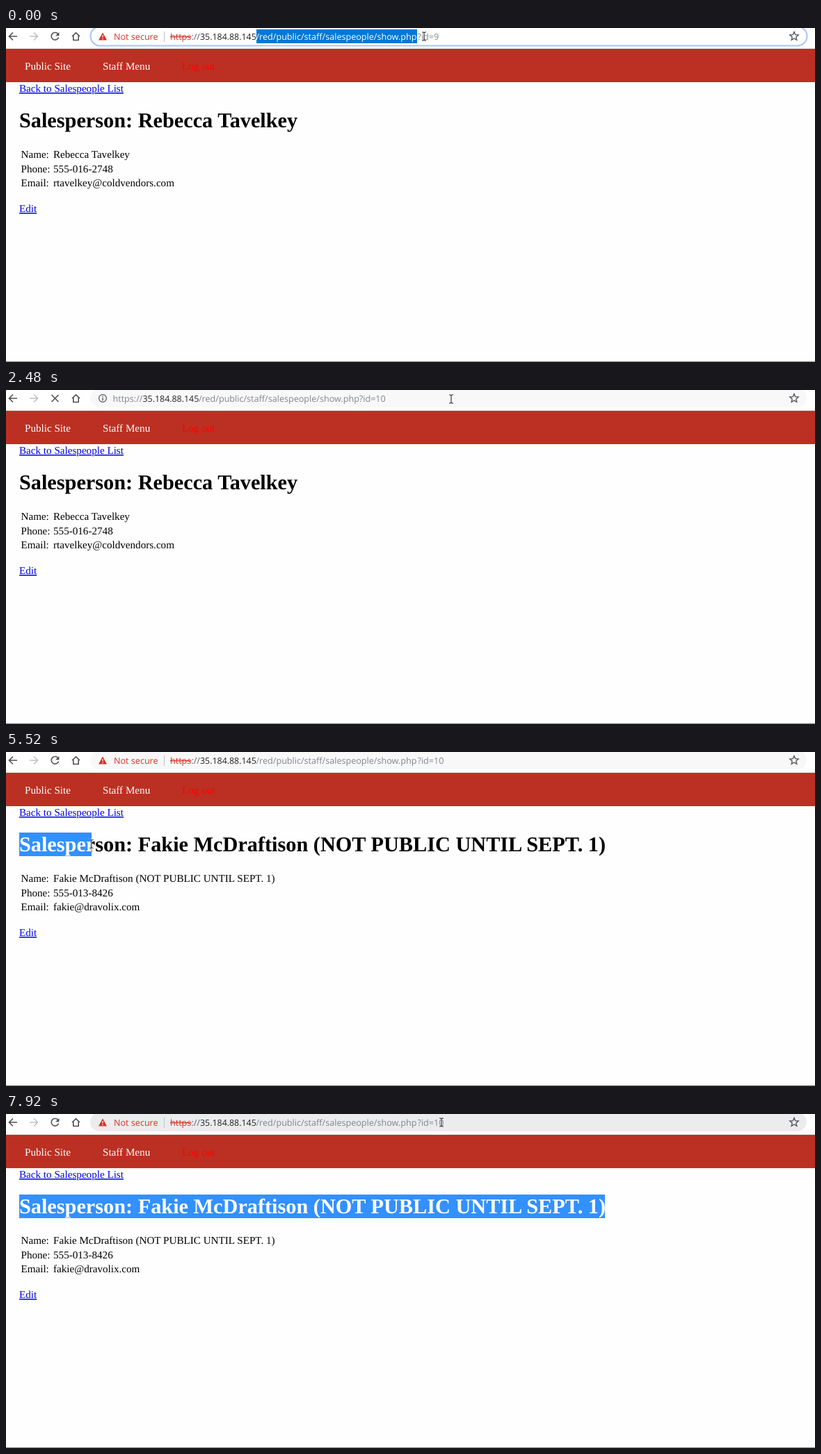
An HTML page for the animation above (8000 ms loop, 1163x481 px).

```html
<!DOCTYPE html>
<html lang="en">
<head>
<meta charset="utf-8">
<title>Salesperson record</title>
<style>
  html, body { margin: 0; width: 100%; height: 100%; overflow: hidden; background: #fefefe; }
  svg { display: block; text-rendering: geometricPrecision; }
  .ui { font: 12.6px "Open Sans", "Noto Sans", sans-serif; fill: #80868b; }
  .page { font: 15.14px "Liberation Serif", "Times New Roman", serif; fill: #000; }
  .h1 { font-size: 30.28px; font-weight: 700; }
  .link { fill: #00e; text-decoration: underline; }
  .dark { fill: #202124; }
  .host { fill: #202124; font-size: 12.4px; }
  .mid { fill: #5f6368; }
  .warn { fill: #d93025; }
  .hit { fill: #1a73e8; font-size: 12.83px; font-weight: 700; }
  .white, .white text { fill: #fff; }
  .line { fill: none; stroke: #4d5054; stroke-width: 1.6; }

  /* Every timeline is 8 s long and changes in hard steps. */
  .t { opacity: 0; animation: 8s step-end infinite; }
  .secure { animation-name: secure; }
  .focus { animation-name: focus; }
  .marked { animation-name: marked; }
  .caret { animation-name: caret; }
  .panel { animation-name: panel; }
  .rows3 { animation-name: rows3; }
  .rows2 { animation-name: rows2; }
  .loading { animation-name: loading; }
  .ready { animation-name: ready; }
  .idle { animation-name: idle; }
  .after { animation-name: after; }
  .before { animation-name: before; }
  .hover { animation-name: hover; }
  .all { animation-name: all; }
  .beam { animation-name: beam; }
  .arrow { animation-name: arrow; }
  .hand { animation-name: hand; }
  @keyframes secure { 0%, 34.375% { opacity: 1 } 19.5% { opacity: 0 } }
  @keyframes focus { 0% { opacity: 1 } 19.5% { opacity: 0 } }
  @keyframes marked { 0% { opacity: 1 } 8.75% { opacity: 0 } }
  @keyframes caret { 8.75% { opacity: 1 } 16% { opacity: 0 } }
  @keyframes panel { 19.5% { opacity: 1 } 31% { opacity: 0 } }
  @keyframes rows3 { 19.5% { opacity: 1 } 27.5% { opacity: 0 } }
  @keyframes rows2 { 27.5% { opacity: 1 } 31% { opacity: 0 } }
  @keyframes loading { 31% { opacity: 1 } 34.375% { opacity: 0 } }
  @keyframes ready { 0%, 34.375% { opacity: 1 } 31% { opacity: 0 } }
  @keyframes idle { 31%, 100% { opacity: 1 } }
  @keyframes after { 34.375%, 100% { opacity: 1 } }
  @keyframes before { 0% { opacity: 1 } 34.375% { opacity: 0 } }
  @keyframes hover { 95.625%, 100% { opacity: 1 } }
  @keyframes all { 78.25% { opacity: 1 } 81.5% { opacity: 0 } }
  @keyframes beam {
    0%, 52.625%, 93.9% { opacity: 1 }
    42.5%, 83.5% { opacity: 0 }
  }
  @keyframes arrow {
    42.5%, 51%, 83.5% { opacity: 1 }
    49.25%, 52.625%, 93.9% { opacity: 0 }
  }
  @keyframes hand { 49.25% { opacity: 1 } 51% { opacity: 0 } }

  /* Typed digits */
  .one, .zero { visibility: hidden; animation: one 8s step-end infinite; }
  .zero { animation-name: zero; }
  @keyframes one { 0% { visibility: hidden } 21.75%, 100% { visibility: visible } }
  @keyframes zero { 0% { visibility: hidden } 27.5%, 100% { visibility: visible } }

  .typing { animation: typing 8s step-end infinite; }
  @keyframes typing {
    0% { transform: translateX(-7px) }
    21.75% { transform: none }
    27.5% { transform: translateX(7px) }
  }

  .drag { width: 0; animation: drag 8s step-end infinite; }
  @keyframes drag {
    0% { width: 0px }
    69% { width: 4px; animation-timing-function: steps(4, jump-both) }
    76.5% { width: 503px }
    78.25% { width: 850px }
    81.5%, 100% { width: 842px }
  }

  .mouse { animation: mouse 8s step-end infinite; }
  @keyframes mouse {
    0% { transform: translate(601px, 12px) }
    1.875% { transform: translate(601px, 12px); animation-timing-function: steps(2, jump-both) }
    5.25% { transform: translate(640px, 13px) }
    40.875% { transform: translate(640px, 13px); animation-timing-function: steps(5, jump-both) }
    49.25% { transform: translate(169px, 88px) }
    51% { transform: translate(112px, 118px) }
    52.625% { transform: translate(80px, 131px) }
    58.375% { transform: translate(80px, 131px); animation-timing-function: steps(3, jump-both) }
    63.625% { transform: translate(23px, 131px) }
    69% { transform: translate(23px, 131px); animation-timing-function: steps(4, jump-both) }
    76.5% { transform: translate(522px, 138px) }
    78.25% { transform: translate(621px, 151px) }
    80% { transform: translate(760px, 151px) }
    81.5% { transform: translate(862px, 141px) }
    83.5% { transform: translate(873px, 152px) }
    85.25% { transform: translate(873px, 152px); animation-timing-function: steps(6, jump-both) }
    95.625% { transform: translate(630px, 10px) }
    97.5% { transform: translate(629px, 10px) }
    99%, 100% { transform: translate(626px, 12px) }
  }
</style>
</head>
<body>
<svg width="1163" height="481" viewBox="0 0 1163 481">
  <defs>
    <clipPath id="dragged"><rect class="drag" x="19" y="116" height="34"/></clipPath>
    <filter id="soft" x="-5%" y="-10%" width="110%" height="120%"><feGaussianBlur stdDeviation="1.2"/></filter>
    <g id="globe">
      <circle r="6.2" fill="#5f6368"/>
      <path d="M-4.6-1.5L-1.2 1.4V4.6Q-4.8 3.4-4.6-1.5M.2-4.6Q4-4.6 4.6-.8L2.4-.4.6 1.4-1.4-1 .8-2.2M2 2.2H4Q3.2 4 1.6 4.4" fill="#fff"/>
    </g>
    <g id="lens" class="line">
      <circle cx="-1.2" cy="-1.2" r="3.6"/>
      <path d="M1.5 1.5L5.4 5.4"/>
    </g>
    <path id="bar" d="M-3-6H-1.2L0-5 1.2-6H3M0-5V5M-3 6H-1.2L0 5 1.2 6H3"/>
    <g id="labels">
      <text x="21.5" y="187">Name:</text>
      <text x="21.5" y="208">Phone:</text>
      <text x="21.5" y="228">Email:</text>
    </g>
    <text id="title" x="19" y="143" class="h1">Salesperson: Fakie McDraftison (NOT PUBLIC UNTIL SEPT. 1)</text>
    <g id="details">
      <text x="68" y="187">Fakie McDraftison (NOT PUBLIC UNTIL SEPT. 1)</text>
      <text x="68" y="208">555-013-8426</text>
      <text x="68" y="228">fakie@dravolix.com</text>
    </g>
  </defs>

  <rect width="1163" height="481" fill="#fefefe"/>

  <!-- page -->
  <g class="page">
    <rect y="30" width="1163" height="48" fill="#bb3022"/>
    <g class="white">
      <text x="27" y="60">Public Site</text>
      <text x="139" y="60">Staff Menu</text>
    </g>
    <text x="253" y="60" fill="#f00">Log out</text>
    <text x="19" y="92" class="link">Back to Salespeople List</text>
    <use href="#labels"/>
    <text x="19" y="265" class="link">Edit</text>
    <g class="t before">
      <text x="19" y="143" class="h1">Salesperson: Rebecca Tavelkey</text>
      <text x="68" y="187">Rebecca Tavelkey</text>
      <text x="68" y="208">555-016-2748</text>
      <text x="68" y="228">rtavelkey@coldvendors.com</text>
    </g>
    <g class="t after">
      <use href="#title"/>
      <use href="#details"/>
    </g>
    <g class="white" clip-path="url(#dragged)">
      <rect x="19" y="116" width="850" height="34" fill="#3390ff"/>
      <use href="#title"/>
    </g>
    <g class="t all white">
      <path d="M21 174H65.5V190H21M67 174H391V190H67M21 194.5H157V210.5H21M21 215H65.5V231H21M67 215H189.5V231H67" fill="#3390ff"/>
      <use href="#labels"/>
      <use href="#details"/>
    </g>
  </g>
  <rect y="480" width="1163" height="1" fill="#858585"/>

  <!-- toolbar -->
  <rect width="1163" height="30" fill="#fff"/>
  <rect y="29" width="1163" height="1" fill="#e4e4e6"/>
  <rect class="t idle" x="121" y="-2" width="1030" height="27" rx="13.5" fill="#f8f8f9"/>
  <rect class="t hover" x="121" y="-2" width="1030" height="27" rx="13.5" fill="#ebecee"/>
  <rect class="t focus" x="121.5" y="-2" width="1030" height="27.5" rx="13.7" fill="#fff" stroke="#a6c5fa" stroke-width="2"/>
  <g class="line">
    <path d="M16 12H5M10 6.5L4.5 12L10 17.5"/>
    <path d="M34 12H45M40 6.5L45.5 12L40 17.5" stroke="#bdc1c6"/>
    <path d="M95 12L100.5 6.8L106 12M96.8 11V17.5H104.2V11"/>
    <path transform="translate(1133 12)" stroke-width="1.3" d="M0-6.5L1.7-2.3 6.2-2 2.8.9 3.8 5.3 0 2.9-3.8 5.3-2.8.9-6.2-2-1.7-2.3Z"/>
  </g>
  <g class="t ready">
    <path class="line" d="M75 9A5.3 5.3 0 1 0 75.6 13.4"/>
    <path d="M76.4 6V11.2H71.2Z" fill="#4d5054"/>
  </g>

  <!-- address: shown with warning -->
  <g class="ui t secure">
    <path d="M139 6.5L145 17.5H133Z" class="warn"/>
    <path d="M139 10V13.6M139 14.8V16.2" stroke="#fff" stroke-width="1.2"/>
    <text x="155" y="17" class="warn">Not secure</text>
    <rect x="227" y="5" width="1" height="15" fill="#bdc1c6"/>
    <text x="236" y="17" class="warn" text-decoration="line-through">https</text>
    <text x="266.4" y="17" class="mid">://</text>
    <text x="279" y="17" class="host">35.184.88.145</text>
    <text x="359.5" y="17">/red/public/staff/salespeople/show.php</text>
  </g>
  <text class="ui t focus" x="591.5" y="17">?id=9</text>
  <text class="ui t after" x="591.5" y="17">?id=10</text>
  <g class="ui t marked">
    <rect x="360" y="2" width="231" height="20" fill="#0078d7"/>
    <text x="359.5" y="17" class="white">/red/public/staff/salespeople/show.php</text>
  </g>
  <rect class="t caret" x="624" y="3" width="1" height="17" fill="#5f6368"/>

  <!-- address: loading -->
  <g class="ui t loading">
    <path class="line" d="M65.5 7L75.5 17M75.5 7L65.5 17"/>
    <circle class="line" cx="139" cy="12" r="5.4" style="stroke-width:1.2"/>
    <path class="line" d="M139 8.8V10.2M139 11.2V15.2" style="stroke-width:1.4"/>
    <text x="153.5" y="17">https://</text>
    <text x="196.5" y="17" class="host">35.184.88.145</text>
    <text x="277" y="17">/red/public/staff/salespeople/show.php?id=10</text>
  </g>

  <!-- suggestions -->
  <g class="ui t panel">
    <g class="t rows3">
      <rect x="114" y="-20" width="1045" height="168" rx="9" fill="#000" opacity=".16" filter="url(#soft)"/>
      <rect x="116" y="-20" width="1041" height="157" rx="8" fill="#fff"/>
      <use href="#globe" x="139" y="47"/>
      <text x="164.5" y="52" class="hit">https://35.184.88.145/red/public/staff/salespeople/show.php?id=<tspan class="one">1</tspan></text>
      <use href="#globe" x="139" y="83"/>
      <text x="164" y="88" class="dark">Staff: Salesperson Fakie McDraftison (NOT PUBLIC UNTIL SEPT. 1)</text>
      <text x="549" y="88" class="mid">-</text>
      <text x="558.5" y="88" class="hit">https://35.184.88.145/red/public/staff/salespeople/show.php?id=1<tspan font-weight="400">0</tspan></text>
      <use href="#lens" x="139" y="119"/>
      <text x="164" y="123" class="dark">https://35.184.88.145/red/public/staff/salespeople/show.php?id=<tspan class="one">1</tspan></text>
      <text x="556" y="123" class="mid">- Quevra Search</text>
    </g>
    <g class="t rows2">
      <rect x="114" y="-20" width="1045" height="132" rx="9" fill="#000" opacity=".16" filter="url(#soft)"/>
      <rect x="116" y="-20" width="1041" height="121" rx="8" fill="#fff"/>
      <use href="#globe" x="139" y="47"/>
      <text x="164.5" y="52" class="hit">https://35.184.88.145/red/public/staff/salespeople/show.php?id=10</text>
      <text x="596" y="52" class="mid">- Staff: Salesperson Fakie McDraftison (NOT PUBLIC UNTIL SEPT. 1)</text>
      <use href="#lens" x="139" y="83"/>
      <text x="164" y="88" class="dark">https://35.184.88.145/red/public/staff/salespeople/show.php?id=10</text>
      <text x="563" y="88" class="mid">- Quevra Search</text>
    </g>
    <use href="#globe" x="139" y="12"/>
    <text x="164" y="17">https://</text>
    <text x="207.5" y="17" class="host">35.184.88.145</text>
    <text x="288" y="17">/red/public/staff/salespeople/show.php?id=<tspan class="one">1</tspan><tspan class="zero">0</tspan></text>
    <rect class="typing" x="552" y="3" width="1" height="17" fill="#5f6368"/>
  </g>

  <!-- pointer -->
  <g class="mouse">
    <g class="t beam" fill="none">
      <use href="#bar" stroke="#fff" stroke-width="2.4" stroke-opacity=".7"/>
      <use href="#bar" stroke="#222" stroke-width="1.1"/>
    </g>
    <path class="t arrow" d="M-4-8V7L-.6 3.9 1.6 8.8 3.8 7.8 1.7 3H6.3Z" fill="#fff" stroke="#000"/>
    <path class="t hand" d="M-2.6 2V-7.4Q-1.5-9.2-.4-7.4V-2.5Q.9-3.6 1.8-2.2 3-3 3.7-1.6 5.4-2 5.4 0V4Q4.6 5.6 4 8.2H-1.7Q-2.4 5.6-5 2.2-5.2.2-2.6 2" fill="#fff" stroke="#111"/>
  </g>
</svg>
</body>
</html>
```
